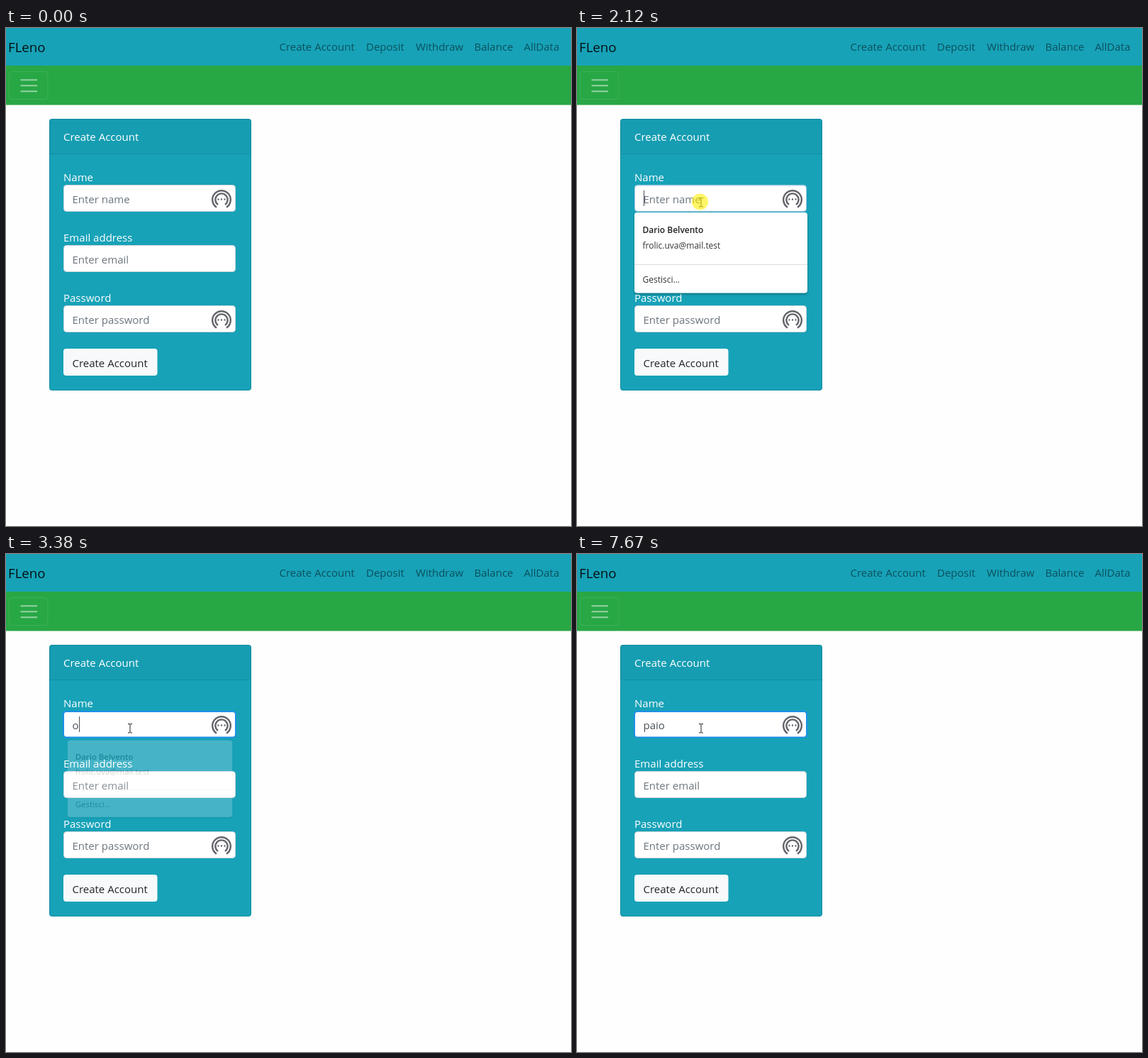
These frames come from a looping animation (797x702 px, 8000 ms). An HTML page:

```html
<!DOCTYPE html>
<html lang="en">
<head>
<meta charset="utf-8">
<title>Create account</title>
<style>
  html, body { margin: 0; height: 100%; overflow: hidden; background: #fefefe; }
  svg { display: block; }
  text { font: 15px "Open Sans", "Noto Sans", sans-serif; white-space: pre; }
  .nav { fill: rgba(0, 0, 0, .5); }
  .brand { font-size: 18.7px; fill: rgba(0, 0, 0, .9); }
  .label { fill: #fff; }
  .hint { fill: #6c757d; }
  .value { fill: #495057; }
  .field { fill: #fff; stroke: #ced4da; }
  #popup text { font-size: 12px; fill: #333; }
  #popup .bold { font-weight: 600; fill: #222; }
</style>
</head>
<body>
<svg width="797" height="702" viewBox="0 0 797 702">
  <defs>
    <g id="key" fill="none" stroke="#63656b" stroke-width="2.4">
      <path d="M-7 10.7A12.8 12.8 0 1 1 7 10.7M-5 7A8.6 8.6 0 1 1 5 7"/>
      <path d="M-4.5 -.5h.01M0 -.5h.01M4.5 -.5h.01" stroke-linecap="round"/>
    </g>
    <filter id="shadow" x="-10%" y="-10%" width="120%" height="125%">
      <feDropShadow dx="0" dy="2" stdDeviation="1.5" flood-opacity=".3"/>
    </filter>
  </defs>

  <rect width="797" height="53" fill="#17a2b8"/>
  <rect y="53" width="797" height="55.5" fill="#28a745"/>
  <text class="brand" x="3" y="34">FLeno</text>
  <g class="nav">
    <text x="385.5" y="32">Create Account</text>
    <text x="508" y="32">Deposit</text>
    <text x="578" y="32">Withdraw</text>
    <text x="660.5" y="32">Balance</text>
    <text x="730.5" y="32">AllData</text>
  </g>
  <rect x="4.5" y="61.5" width="54.5" height="39" rx="4" fill="none" stroke="#fff" stroke-opacity=".1"/>
  <path d="M20.5 73.2H44M20.5 81.2H44M20.5 89.2H44" stroke="#fff" stroke-opacity=".5" stroke-width="2"/>

  <rect x="61" y="128" width="285" height="383" rx="4" fill="#17a2b8"/>
  <path d="M61 177V132a4 4 0 0 1 4-4H342a4 4 0 0 1 4 4V177z" fill-opacity=".03"/>
  <path d="M62 177.5H345" stroke="#000" stroke-opacity=".125"/>
  <rect x="61.5" y="128.5" width="284" height="382" rx="3.5" fill="none" stroke="#000" stroke-opacity=".125"/>
  <g class="label">
    <text x="81" y="159">Create Account</text>
    <text x="81" y="216">Name</text>
    <text x="81" y="300.5">Email address</text>
    <text x="81" y="386">Password</text>
  </g>
  <rect class="field" x="81.5" y="221.5" width="242" height="37" rx="4"/>
  <rect class="field" x="81.5" y="306.5" width="242" height="37" rx="4"/>
  <rect class="field" x="81.5" y="391.5" width="242" height="37" rx="4"/>
  <text class="hint" x="93.5" y="331.5">Enter email</text>
  <text class="hint" x="93.5" y="417">Enter password</text>
  <rect x="81" y="452" width="132.5" height="38" rx="4" fill="#f8f9fa"/>
  <text x="93.5" y="477.5" fill="#212529">Create Account</text>

  <rect id="ring" x="81" y="222" width="243" height="36.5" rx="4" fill="none" stroke="#1e90e6" stroke-width="2"/>
  <text id="hint" class="hint" x="93.5" y="247">Enter name</text>
  <text id="value" class="value" x="93.5" y="247"></text>
  <rect id="caret" y="229" width="1" height="22" fill="#495057"/>
  <use href="#key" x="304" y="242"/>
  <use href="#key" x="304" y="412"/>

  <g id="popup">
    <rect x="81" y="260" width="244" height="113.5" rx="4" fill="#fff" filter="url(#shadow)"/>
    <path d="M81 333.5H325" stroke="#dadce0"/>
    <text class="bold" x="92.5" y="289">Dario Belvento</text>
    <text x="92.5" y="311">frolic.uva@mail.test</text>
    <text x="92.5" y="359">Gestisci...</text>
  </g>

  <path id="arrow" d="M.5 .5V13l2.9-2.7 2.1 4.700 2-.9-2-4.500H9z" fill="#fff" stroke="#000" stroke-width=".9"/>
  <path id="beam" d="M172 239.5h2.300l.7.700.7-.700H178M175 240v11.500M172 252h2.300l.7-.700.7.700H178" fill="none" stroke="#222"/>
  <circle id="click" cx="173.5" cy="245" r="11.500" fill="#fe0" fill-opacity=".6"/>
</svg>
<script>
const LOOP = 8000, STEP = 70;
const $ = id => document.getElementById(id);
const show = (id, on) => $(id).style.display = on ? "" : "none";

// [time, text in the name field, caret visible]
const typing = [
  [0, "", 0], [2040, "", 1], [2570, "", 0],
  [3100, "o", 1], [3650, "oe", 1], [4180, "oe", 0],
  [4310, "o", 1], [4710, "o", 0], [5240, "o", 1], [5770, "", 1],
  [6320, "p", 1], [6450, "pa", 1], [6980, "pa", 0],
  [7050, "pai", 1], [7120, "paio", 1], [7670, "paio", 0]
];
// [time, opacity], held until the next entry
const popup = [[0, 0], [2040, .4], [2110, 1], [3170, .94], [3240, .75], [3310, .48], [3380, .2], [3450, 0]];
const ring = [[0, 0], [2040, .05], [2110, .2], [2180, .65], [2240, 1]];

const at = (list, t) => list.findLast(entry => entry[0] <= t);
// parabola through a, b, c at p = 0, 1/2, 1
const curve = (a, b, c, p) => a * (1 - p) * (1 - 2 * p) + 4 * b * p * (1 - p) + c * p * (2 * p - 1);
const progress = (t, start, end) => Math.min(1, Math.floor((t - start) / STEP) * STEP / (end - start));

function arrowAt(t) {
  if (t < 1360) {
    const p = progress(t, 530, 1230);
    return [curve(640, 381, 270, p), curve(690, 348.5, 107, p)];
  }
  const p = progress(t, 1290, 1570);
  return [270 - 95 * p, 107 + 138 * p];
}

function draw(t) {
  const [, text, caret] = at(typing, t);
  $("value").textContent = text;
  show("hint", !text);
  show("caret", caret);
  $("caret").setAttribute("x", Math.floor(94 + (text ? $("value").getComputedTextLength() : 0)));

  const alpha = at(popup, t)[1];
  const scale = t > 3100 ? 1 - .06 * (1 - alpha) : 1;
  $("popup").setAttribute("opacity", alpha);
  $("popup").setAttribute("transform", `translate(203 317) scale(${scale}) translate(-203 -317)`);
  $("ring").setAttribute("opacity", at(ring, t)[1]);
  show("click", t >= 2040 && t < 2240);

  const overField = t >= 1570;
  show("beam", overField);
  show("arrow", t >= 530 && !overField);
  $("arrow").setAttribute("transform", `translate(${arrowAt(t)})`);
}

const start = performance.now();
function tick() {
  draw((performance.now() - start) % LOOP);
  requestAnimationFrame(tick);
}
tick();
</script>
</body>
</html>
```
